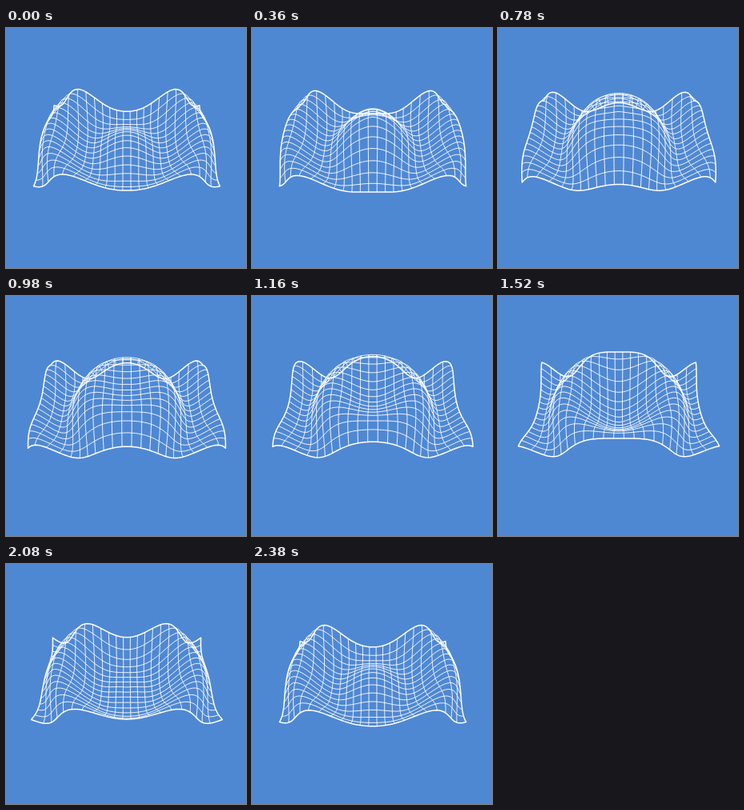
Recreate the animation shown at these times as an HTML page with a canvas. Size 300x300 px, loop 2400 ms.

```html
<!DOCTYPE html>
<html lang="en">
<head>
<meta charset="utf-8">
<title>Ripple mesh</title>
<style>
  html, body { margin: 0; width: 100%; height: 100%; overflow: hidden; background: #4f88d2; }
  canvas { display: block; width: 300px; height: 300px; }
</style>
</head>
<body>
<canvas id="stage" width="300" height="300"></canvas>
<script>
const ctx = document.getElementById('stage').getContext('2d');
const LOOP = 2400;
const COLS = 21, ROWS = 15, STEPS = 72;
const HALF_DEPTH = 0.595;
const CAMERA = { x: 151, y: 150.4, focal: 268, distance: 2.767, sin: 0.838, cos: 0.546 };

// Outward ripple whose wavelength shortens and height fades with radius.
function height(x, z, phase) {
  const q = x * x + z * z;
  const amp = 0.52 - 0.47 * Math.sqrt(q) + 0.1 * q;
  return 0.267 + amp * Math.cos(phase - 1.64 - 6.09 * q);
}

function project(x, z, phase) {
  const h = height(x, z, phase);
  const scale = CAMERA.focal / (CAMERA.distance - z * CAMERA.cos - h * CAMERA.sin);
  return [CAMERA.x + x * scale, CAMERA.y + (z * CAMERA.sin - h * CAMERA.cos) * scale];
}

// Adds one mesh line; at(s) gives the ground point for s in -1..1.
function trace(at, phase) {
  for (let i = 0; i <= STEPS; i++) {
    const [x, z] = at(i / STEPS * 2 - 1);
    const p = project(x, z, phase);
    if (i) ctx.lineTo(...p); else ctx.moveTo(...p);
  }
}

const column = u => s => [u, s * HALF_DEPTH];
const row = v => s => [s, v * HALF_DEPTH];

function stroke(lines, width, phase) {
  ctx.beginPath();
  lines.forEach(line => trace(line, phase));
  ctx.lineWidth = width;
  ctx.stroke();
}

const inner = [];
for (let i = 1; i < COLS; i++) inner.push(column(i / COLS * 2 - 1));
for (let i = 1; i < ROWS; i++) inner.push(row(i / ROWS * 2 - 1));
const border = [column(-1), column(1), row(-1), row(1)];

function draw(now) {
  const phase = now % LOOP / LOOP * Math.PI * 2;
  ctx.fillStyle = '#4f88d2';
  ctx.fillRect(0, 0, 300, 300);
  ctx.strokeStyle = '#fff';
  ctx.lineJoin = ctx.lineCap = 'round';
  stroke(inner, 0.9, phase);
  stroke(border, 1.5, phase);
}

const start = performance.now();
function tick() {
  draw(performance.now() - start);
  requestAnimationFrame(tick);
}
tick();
</script>
</body>
</html>
```
